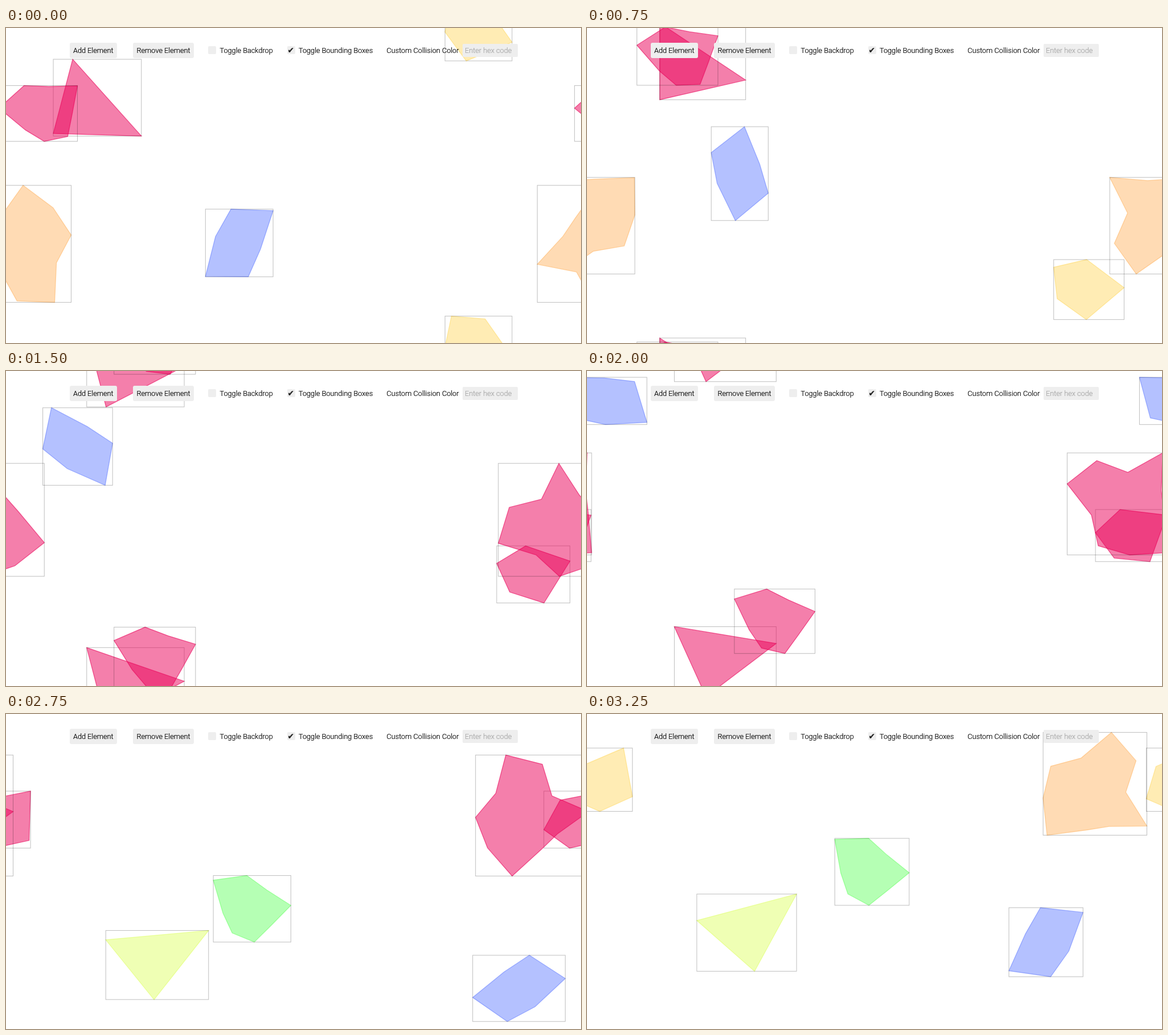
Write an HTML page with a canvas that moves like this. It is 1010 px wide and 555 px high and loops after 3.5 s.

```html
<!DOCTYPE html>
<html lang="en">
<head>
<meta charset="utf-8">
<title>Polygon collisions</title>
<style>
  html, body { margin: 0; width: 100%; height: 100%; overflow: hidden; background: #fff; }
  body { position: relative; font: 300 12.7px/27px Roboto, sans-serif; color: #000; -webkit-text-stroke: 0.2px; }
  canvas { position: absolute; left: 0; top: 0; }
  span { position: absolute; top: 25.5px; height: 27px; white-space: nowrap; }
  .button { padding: 0 6.5px; background: #eee; border-radius: 3px; }
  .option { padding-left: 20.5px; }
  .option::before { content: ""; position: absolute; left: 0; top: 6.5px; width: 14px; height: 14px; background: #eee; border-radius: 2px; }
  .checked::after { content: "✔"; position: absolute; left: 1px; font: 14px/27px "DejaVu Sans", sans-serif; color: #222; }
  .field { top: 27.5px; width: 92.5px; height: 23px; padding-left: 4px; line-height: 23px;
           background: #eee; border-radius: 2px; color: #a5a5a5; }
</style>
</head>
<body>
<canvas id="stage" width="1010" height="555"></canvas>
<span class="button" style="left:111.5px">Add Element</span>
<span class="button" style="left:223px">Remove Element</span>
<span class="option" style="left:355px">Toggle Backdrop</span>
<span class="option checked" style="left:493.5px">Toggle Bounding Boxes</span>
<span style="left:668.5px">Custom Collision Color</span>
<span class="field" style="left:802px">Enter hex code</span>
<script>
const W = 1011, H = 555, STEP = 250, STEPS = 14;
const HIT = 'rgb(234,0,89)';
const canvas = document.getElementById('stage'), ctx = canvas.getContext('2d');
const rad = degrees => degrees * Math.PI / 180;

// Corners sit at equal angles around a hub, each at its own radius,
// and are then measured from their mean, the point the body spins about.
function makeBody(hue, start, move, phase, spin, radii) {
  const corners = radii.map((r, i) => {
    const a = rad(phase + 360 * i / radii.length);
    return [r * Math.cos(a), r * Math.sin(a)];
  });
  const mean = axis => corners.reduce((sum, p) => sum + p[axis], 0) / corners.length;
  return { hue, start, move, spin, points: shift(corners, [-mean(0), -mean(1)]) };
}

// hue, start position, drift per step, start angle, spin per step, corner radii
const bodies = [
  makeBody(73, [146, 698.8], [10.7, -24.67], -98.4, -4.86, [94, 115, 61]),
  makeBody(119, [68.2, 701.2], [32.72, -32.65], -40.4, 3.09, [71, 45, 57, 52, 49, 84, 61, 45]),
  makeBody(230, [409.2, 379], [-47.2, -40.93], 255.7, -13.39, [62, 82, 38, 61, 84, 44]),
  makeBody(45, [818.5, 555.1], [16.75, -33.18], 20.5, -6.01, [83, 62, 41.5, 52, 49]),
  makeBody(31, [1040, 388.5], [-11.52, -19.24], 273, 17.46, [112, 93, 93.5, 69, 112.5, 92, 52.5, 105.5, 61, 64.6])
];

const offsets = [-1, 0, 1].flatMap(i => [-1, 0, 1].map(j => [i * W, j * H]));
const wrap = (v, size) => ((v % size) + size) % size;
const edges = points => points.map((p, i) => [p, points[(i + 1) % points.length]]);

function shift(points, [dx, dy]) {
  return points.map(([x, y]) => [x + dx, y + dy]);
}

function place({ start, move, spin, points }, step) {
  const c = Math.cos(rad(spin * step)), s = Math.sin(rad(spin * step));
  const turned = points.map(([x, y]) => [x * c - y * s, x * s + y * c]);
  return shift(turned, [wrap(start[0] + move[0] * step, W), wrap(start[1] + move[1] * step, H)]);
}

const side = (a, b, p) => (b[0] - a[0]) * (p[1] - a[1]) - (b[1] - a[1]) * (p[0] - a[0]);
const cross = ([a, b], [c, d]) =>
  side(a, b, c) * side(a, b, d) < 0 && side(c, d, a) * side(c, d, b) < 0;
const collide = (p, q) => offsets.some(o => {
  const other = edges(shift(q, o));
  return edges(p).some(e => other.some(f => cross(e, f)));
});

function drawShape(points, color) {
  ctx.beginPath();
  points.forEach(([x, y]) => ctx.lineTo(x, y));
  ctx.closePath();
  ctx.fillStyle = ctx.strokeStyle = color;
  ctx.globalAlpha = 0.5;
  ctx.fill();
  ctx.globalAlpha = 0.6;
  ctx.lineWidth = 1.3;
  ctx.stroke();

  const xs = points.map(p => p[0]), ys = points.map(p => p[1]);
  const left = Math.min(...xs), top = Math.min(...ys);
  ctx.globalAlpha = 0.26;
  ctx.strokeStyle = '#000';
  ctx.lineWidth = 1;
  ctx.strokeRect(left, top, Math.max(...xs) - left, Math.max(...ys) - top);
}

function render(step) {
  ctx.clearRect(0, 0, canvas.width, canvas.height);
  const placed = bodies.map(b => place(b, step));
  placed.forEach((points, i) => {
    const hit = placed.some((other, j) => j !== i && collide(points, other));
    const color = hit ? HIT : `hsl(${bodies[i].hue}, 100%, 70.8%)`;
    offsets.forEach(o => drawShape(shift(points, o), color));
  });
}

let begin, shown;
function tick(now) {
  begin ??= now;
  const step = Math.floor((now - begin) / STEP) % STEPS;
  if (step !== shown) render(shown = step);
  requestAnimationFrame(tick);
}
render(shown = 0);
requestAnimationFrame(tick);
</script>
</body>
</html>
```
